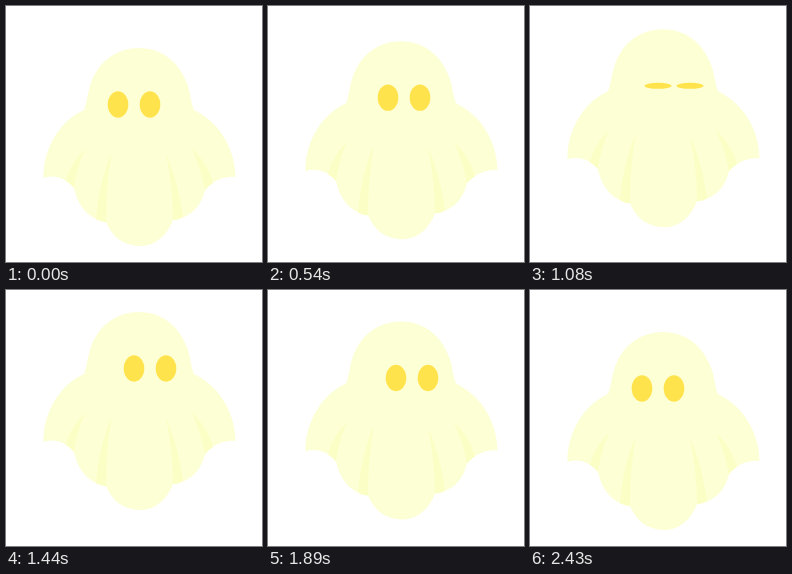
Write an HTML page that moves like this. It is 256x256 px and loops after 2520 ms.

```html
<!DOCTYPE html>
<html lang="en">
<head>
<meta charset="utf-8">
<title>Floating ghost</title>
<style>
  html, body { margin: 0; width: 100%; height: 100%; overflow: hidden; background: #fff; }
  svg { display: block; width: 100%; height: 100%; }
</style>
</head>
<body>
<svg viewBox="0 0 256 256">
  <g id="ghost">
    <path fill="#fdffd5" d="M133 42C109 42 91 57 84 80C81 90 81 97 78 104C54 115 37 142 37.5 172
      C49 168 61 173 68 182C72 201 84 214 100 216C106 231 118 240 134 240
      C149 240 161 230 167 214C184 212 195 201 199 184C207 175 217 170 229.5 171
      C229 142 213 116 188 104C185 97 185 90 182 80C174 57 157 42 133 42Z"/>
    <g fill="#fbffc5">
      <path d="M79 143C69 153 62 164 60 175Q65 178 68 182C70 167 74 154 79 143Z"/>
      <path d="M106 146C97 166 92 190 90 213Q95 216 100 216C100 190 102 166 106 146Z"/>
      <path d="M160 148C164 168 167 190 167 214Q173 214 177 211C174 190 169 168 160 148Z"/>
      <path d="M186 143C192 156 196 169 199 184Q202 180 207 177C203 163 196 152 186 143Z"/>
    </g>
    <g fill="#ffe34d">
      <ellipse class="eye" cy="98.5"/>
      <ellipse class="eye" cy="98.5"/>
    </g>
  </g>
</svg>
<script>
const LOOP = 2520, STEP = 90;
const ghost = document.getElementById('ghost');
const eyes = document.querySelectorAll('.eye');

// Tracks: [time, value] with sine easing between entries
const rise = [[30, 0], [1330, -20.5], [2470, 0]];
const look = [[450, 0], [630, 16], [2070, 16], [2250, 0]];
const blink = [[900, 0], [1080, 1], [1260, 0]];

function at(track, t) {
  if (t <= track[0][0]) return track[0][1];
  for (let i = 1; i < track.length; i++) {
    const [t0, a] = track[i - 1], [t1, b] = track[i];
    if (t <= t1) return a + (b - a) * (1 - Math.cos(Math.PI * (t - t0) / (t1 - t0))) / 2;
  }
  return track[track.length - 1][1];
}

function draw(t) {
  const shut = at(blink, t);
  ghost.setAttribute('transform', `translate(0 ${at(rise, t)})`);
  eyes.forEach((eye, i) => {
    eye.setAttribute('cx', 112 + 32 * i + at(look, t));
    eye.setAttribute('rx', 10.3 + 3.2 * shut);
    eye.setAttribute('ry', 13.2 - 10.2 * shut);
  });
}

const start = performance.now();
function tick() {
  const t = (performance.now() - start) % LOOP;
  draw(Math.floor(t / STEP) * STEP);
  requestAnimationFrame(tick);
}
tick();
</script>
</body>
</html>
```
